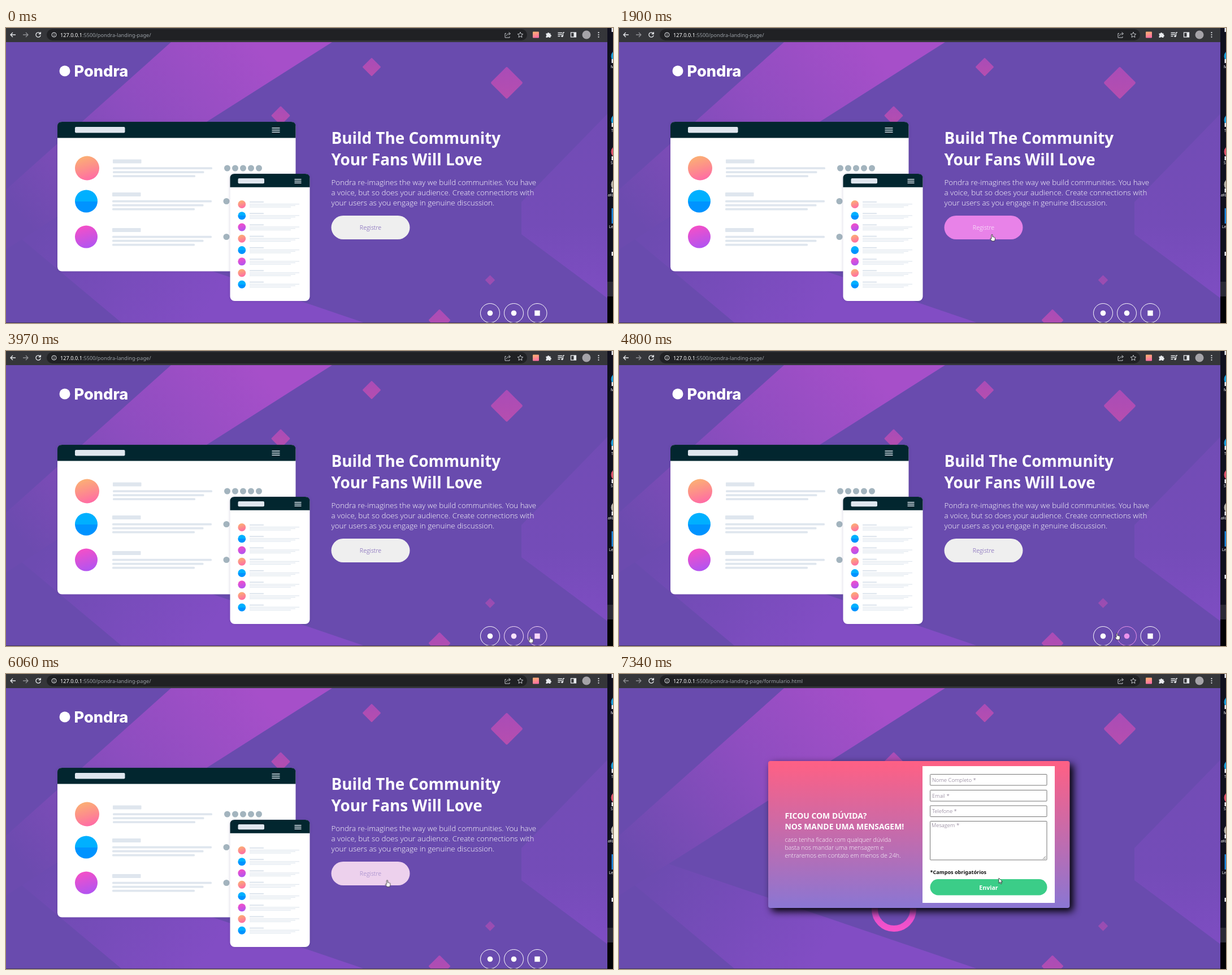
Animation of 1074x522 px, one loop 8000 ms. Source, as an HTML page:

```html
<!DOCTYPE html>
<html lang="en">
<head>
<meta charset="utf-8">
<title>Landing page demo</title>
<style>
html, body { margin: 0; width: 100%; height: 100%; overflow: hidden; background: #694bae; }
svg { display: block; width: 1074px; height: 522px; }
text { font-family: "Noto Sans", "Open Sans", sans-serif; fill: #fff; white-space: pre; }
.light, .light text { font-family: "Open Sans", "Noto Sans", sans-serif; font-weight: 300; }
.bold { font-weight: 700; }
.url { font-size: 9.2px; }
.url .dim { fill: #9aa0a6; }
.logo { font: 800 27.2px Inter, "Open Sans", sans-serif; }
.h1 { font-size: 27.85px; }
.lead { font-size: 13.4px; }
.h2 { font-size: 13.95px; }
.note { font-size: 10.65px; }
.hint { font-size: 9.5px; fill: #75657f; }
.label { font-size: 10.6px; text-anchor: middle; }
.desk { font-size: 6.5px; }
.field { fill: #fff; stroke: #767676; }
.icon { fill: none; stroke: #e8eaed; stroke-width: 1.3; }

/* one loop is 8 s, so 1% is 80 ms */
.home, .form, .back, .cursor, .hand, .arrow, .btn, .btn-text, .soc {
  animation-duration: 8s; animation-iteration-count: infinite;
}
.home { animation-name: home; animation-timing-function: step-end; }
.form { animation-name: form; animation-timing-function: step-end; }
.back { animation-name: back; animation-timing-function: step-end; }
.hand { animation-name: hand; animation-timing-function: step-end; }
.arrow { animation-name: arrow; animation-timing-function: step-end; }
.cursor { animation-name: cursor; animation-timing-function: linear; }
.btn { animation-name: btn; }
.btn-text { animation-name: btn-text; }
.soc { color: #fff; }
.soc0 { animation-name: soc0; }
.soc1 { animation-name: soc1; }
.soc2 { animation-name: soc2; }

@keyframes home { 0% { visibility: visible } 91.75%, 100% { visibility: hidden } }
@keyframes form { 0% { visibility: hidden } 91.75%, 100% { visibility: visible } }
@keyframes back { 0% { opacity: 1 } 91.75%, 100% { opacity: .5 } }
@keyframes btn {
  0%, 16%, 28.4%, 75.1% { fill: #efefef }
  19.5%, 24.6%, 78.6%, 100% { fill: #e882e8 }
}
@keyframes btn-text {
  0%, 16%, 28.4%, 75.1% { fill: #694bae }
  19.5%, 24.6%, 78.6%, 100% { fill: #fff }
}
@keyframes soc0 {
  0%, 32.3%, 40.2%, 61%, 68%, 100% { color: #fff }
  35.9%, 37.6%, 64%, 65.4% { color: #e882e8 }
}
@keyframes soc1 {
  0%, 40.3%, 51.5%, 55.2%, 63%, 100% { color: #fff }
  43.8%, 48%, 58%, 59.6% { color: #e882e8 }
}
@keyframes soc2 {
  0%, 49%, 57.3%, 100% { color: #fff }
  52%, 54.2% { color: #e882e8 }
}
@keyframes hand {
  0%, 24.5%, 37.5%, 47.4%, 54.8%, 60.1%, 65.4%, 88.5%, 100% { opacity: 0 }
  15.4%, 31.8%, 39.5%, 48.8%, 55.5%, 60.9%, 74.6% { opacity: 1 }
}
@keyframes arrow {
  0%, 24.5%, 37.5%, 47.4%, 54.8%, 60.1%, 65.4%, 88.5%, 100% { opacity: 1 }
  15.4%, 31.8%, 39.5%, 48.8%, 55.5%, 60.9%, 74.6% { opacity: 0 }
}
@keyframes cursor {
  0%, 6.49% { transform: translate(1200px, 600px) }
  6.5% { transform: translate(1006px, 514px) }
  16%, 22.8% { transform: translate(659.5px, 364.5px) }
  23.8% { transform: translate(660px, 365px) }
  32.25%, 37.5% { transform: translate(871px, 507px) }
  40.25% { transform: translate(888.5px, 505px) }
  43.75% { transform: translate(900px, 504px) }
  47.1% { transform: translate(912px, 505px) }
  51.9% { transform: translate(941px, 504px) }
  53.1% { transform: translate(938px, 504px) }
  57.4% { transform: translate(902px, 502px) }
  60%, 60.6% { transform: translate(881px, 499px) }
  63.75% { transform: translate(857px, 498px) }
  68%, 68.5% { transform: translate(830px, 483px) }
  75%, 88.49% { transform: translate(674.5px, 364.5px) }
  88.5%, 100% { transform: translate(672px, 361px) }
}
</style>
</head>
<body>
<svg viewBox="0 0 1074 522">
  <defs>
    <linearGradient id="band" gradientUnits="userSpaceOnUse" x1="440" y1="25" x2="40" y2="350">
      <stop offset="0" stop-color="#a64fc9"/><stop offset=".5" stop-color="#8c4dbf"/><stop offset="1" stop-color="#6c4baf"/>
    </linearGradient>
    <linearGradient id="fold" gradientUnits="userSpaceOnUse" x1="330" y1="540" x2="60" y2="360">
      <stop offset="0" stop-color="#824dc4"/><stop offset="1" stop-color="#6d4bb1"/>
    </linearGradient>
    <linearGradient id="side" x2="0" y2="1">
      <stop offset="0" stop-color="#724cb5"/><stop offset=".6" stop-color="#744cb8"/><stop offset="1" stop-color="#7e4dc2"/>
    </linearGradient>
    <linearGradient id="gem" x2="1" y2="1">
      <stop offset="0" stop-color="#a94cb7"/><stop offset="1" stop-color="#b64eaf"/>
    </linearGradient>
    <linearGradient id="ring" x2="0" y2="1">
      <stop offset=".5" stop-color="#b94dc0"/><stop offset=".72" stop-color="#e64fca"/><stop offset="1" stop-color="#f552cb"/>
    </linearGradient>
    <linearGradient id="orange" x1=".3" x2=".6" y2="1">
      <stop offset="0" stop-color="#fbb173"/><stop offset=".5" stop-color="#fd8f8a"/><stop offset="1" stop-color="#ff6ba6"/>
    </linearGradient>
    <linearGradient id="blue" x2="0" y2="1">
      <stop offset=".5" stop-color="#00b0ff"/><stop offset=".5" stop-color="#0093ff"/>
    </linearGradient>
    <linearGradient id="magenta" x1=".3" x2=".6" y2="1">
      <stop offset="0" stop-color="#f64fc6"/><stop offset="1" stop-color="#b054f2"/>
    </linearGradient>
    <linearGradient id="panel" x2="0" y2="1">
      <stop offset="0" stop-color="#ff6084"/><stop offset="1" stop-color="#8a76d3"/>
    </linearGradient>
  </defs>

  <rect width="1074" height="522" fill="#694bae"/>
  <path d="M292 25H577L28 374L0 392V286Z" fill="url(#band)"/>
  <path d="M28 374L88 336L635 522H205Z" fill="url(#fold)"/>
  <path d="M1064 152L912 308V365L1064 478Z" fill="url(#side)"/>
  <g id="gems" fill="url(#gem)"></g>
  <circle cx="486.5" cy="416.5" r="34" fill="none" stroke="url(#ring)" stroke-width="11"/>

  <g class="home">
    <circle cx="104" cy="76" r="9.5" fill="#fff"/>
    <text class="logo" x="120.500" y="86">Pondra</text>
    <g id="mock"></g>
    <g class="bold h1">
      <text x="575.500" y="204.500">Build The Community</text>
      <text x="575.500" y="242.500">Your Fans Will Love</text>
    </g>
    <g class="light lead">
      <text x="575.500" y="278.300">Pondra re-imagines the way we build communities. You have</text>
      <text x="575.500" y="296.300">a voice, but so does your audience. Create connections with</text>
      <text x="575.500" y="314.300">your users as you engage in genuine discussion.</text>
    </g>
    <rect class="btn" x="575.500" y="332" width="139" height="42" rx="21"/>
    <text class="btn-text label light" x="645" y="357">Registre</text>
    <g id="social"></g>
  </g>

  <g class="form">
    <rect x="264" y="154" width="533.500" height="260" rx="4" fill="url(#panel)" style="filter: drop-shadow(6px 6px 7px #000)"/>
    <g class="bold h2">
      <text x="293.500" y="255.500">FICOU COM DÚVIDA?</text>
      <text x="293.500" y="274.500">NOS MANDE UMA MENSAGEM!</text>
    </g>
    <g class="light note">
      <text x="293.500" y="297">caso tenha ficado com qualquer dúvida</text>
      <text x="293.500" y="311">basta nos mandar uma mensagem e</text>
      <text x="293.500" y="325">entraremos em contato em menos de 24h.</text>
    </g>
    <rect x="537" y="163" width="234" height="242" fill="#fff"/>
    <g id="fields"></g>
    <path d="M750 327.500L755 322.500M753 327.500L755 325.500" stroke="#444" stroke-width=".8"/>
    <text class="bold" x="550.500" y="353.500" style="font-size: 9.1px; fill: #111">*Campos obrigatórios</text>
    <rect x="550.500" y="363" width="207" height="28.500" rx="14.200" fill="#3bcd88"/>
    <text class="label bold" x="654" y="381.500">Enviar</text>
  </g>

  <!-- browser bar -->
  <rect width="1064" height="25" fill="#35363a"/>
  <rect x="72" y="2" width="850" height="20" rx="10" fill="#202124"/>
  <g class="icon">
    <path class="back" d="M17 12H8.500M12 8L8 12L12 16"/>
    <path d="M30 12H38.500M35 8L39 12L35 16" opacity=".5"/>
    <path d="M60.500 9.500A4.200 4.200 0 1 0 61.200 13M61.300 7V10.500H57.800"/>
    <g stroke-width="1"><circle cx="85" cy="12" r="4"/><path d="M85 11.500V14.300M85 9.500V10.500"/></g>
    <g stroke-width="1" stroke="#c4c7cb">
      <path d="M885 9.500H883V17H891V15M885.500 14C886 11 888 10 892 10M889.500 7.500L892.500 10L889.500 12.500"/>
      <path d="M910 7.300L911.400 10.500L914.800 10.800L912.200 13.100L913 16.500L910 14.700L907 16.500L907.800 13.100L905.200 10.800L908.600 10.500Z"/>
    </g>
    <path d="M976.500 8.500H984M976.500 11.500H984M976.500 14.500H980.500M985.500 8V14.500M985.500 8H988"/>
    <rect x="999.500" y="8" width="9" height="8"/>
  </g>
  <g fill="#e8eaed">
    <path d="M955.500 9.500H958A1.600 1.600 0 1 1 961.200 9.500H963.500V12A1.500 1.500 0 1 1 963.500 15V17H960.800A1.500 1.500 0 0 0 958 17H955.500V14.500A1.500 1.500 0 0 0 955.500 11.800Z"/>
    <circle cx="984" cy="14.500" r="1.700"/>
    <path d="M1004.500 8H1008.500V16H1004.500Z"/>
    <circle cx="1048.500" cy="8.200" r="1.100"/><circle cx="1048.500" cy="12" r="1.100"/><circle cx="1048.500" cy="15.800" r="1.100"/>
  </g>
  <rect x="932" y="6.500" width="11" height="11" rx="1" fill="url(#orange)"/>
  <circle cx="1027" cy="12" r="7.500" fill="#a5a3a8"/>
  <text class="url home" x="96" y="15.700">127.0.0.1<tspan class="dim">:5500/pondra-landing-page/</tspan></text>
  <text class="url form" x="96" y="15.700">127.0.0.1<tspan class="dim">:5500/pondra-landing-page/formulario.html</tspan></text>

  <!-- desktop edge -->
  <rect y="521" width="1064" height="1" fill="#41355f"/>
  <rect x="1064" width="10" height="522" fill="#10101e"/>
  <rect x="1064" y="449" width="10" height="26" fill="#2b2a36"/>
  <rect x="1064" y="475" width="10" height="47" fill="#030305"/>
  <g id="desk"></g>

  <g class="cursor">
    <path class="arrow" d="M0 0V9.300L2.200 7.300L3.700 10.600L5.200 9.900L3.700 6.800H6.600Z" fill="#fff" stroke="#222" stroke-width=".8"/>
    <path class="hand" d="M-1 1Q0 -.6 1 1V4.600Q2 4 2.700 5Q3.700 4.500 4.200 5.500Q5.300 5.300 5.400 6.600V9Q5.200 10.500 4.300 12H-.5Q-1.500 10 -3.300 8Q-3.300 6.300 -1 7.800Z" fill="#fff" stroke="#222" stroke-width=".8"/>
  </g>
</svg>
<script>
const NS = "http://www.w3.org/2000/svg";
const $ = id => document.getElementById(id);

function add(parent, tag, attrs, text) {
  const el = document.createElementNS(NS, tag);
  for (const k in attrs) el.setAttribute(k, attrs[k]);
  if (text) el.textContent = text;
  parent.appendChild(el);
  return el;
}
const box = (p, x, y, width, height, fill, rx = 0) => add(p, "rect", { x, y, width, height, fill, rx });
const dot = (p, cx, cy, r, fill) => add(p, "circle", { cx, cy, r, fill });

const PALE = "#dfe6ee", DARK = "#02262f", GREY = "#a3b4be";
const skins = ["url(#orange)", "url(#blue)", "url(#magenta)"];

// rounded diamonds: centre, half diagonal, opacity
for (const [x, y, r, opacity] of [[647, 69, 16, 1], [886, 97, 28, 1], [486, 155, 16.5, 1], [856.5, 446, 8.5, .7], [767, 517, 19, 1]]) {
  const s = r * 1.46;
  add($("gems"), "rect", { x: -s / 2, y: -s / 2, width: s, height: s, rx: r * .09, opacity, transform: `translate(${x} ${y}) rotate(45)` });
}

function card(x, y, w, h, head) {
  const g = add($("mock"), "g", {});
  g.style.filter = "drop-shadow(0 0 2px #3a2a7040)";
  box(g, x, y, w, h, "#fff", 8);
  add(g, "path", { d: `M${x} ${y + head}V${y + 8}q0 -8 8 -8H${x + w - 8}q8 0 8 8V${y + head}Z`, fill: DARK });
  return g;
}
function burger(g, x, y, w, gap) {
  for (let i = 0; i < 3; i++) box(g, x, y + i * gap, w, 1.5, PALE);
}

const big = card(91, 166, 421.5, 264.5, 28.5);
box(big, 122, 175, 88.5, 10.5, PALE, 2);
burger(big, 470.5, 176.3, 14, 3.6);
[248, 306.5, 369.5].forEach((y, i) => {
  const x = i ? 188 : 189;
  dot(big, i ? 142 : 143.5, y, i ? 20 : 21.5, skins[i]);
  box(big, x, y - 15.5, 50.5, 7, PALE, 1);
  [176, 161.5, 146].forEach((w, k) => box(big, x, y - 1.7 + k * 7, w, 3.6, PALE, 1.5));
  for (let k = 0; k < (i ? 1 : 5); k++) dot(big, (i ? 390 : 391.5) + k * 14, y, 5.5, GREY);
});

const small = card(396.5, 258, 141, 225, 23.8);
box(small, 410.5, 266, 46.5, 9.3, PALE, 2);
burger(small, 510.5, 267, 12, 3.2);
for (let i = 0; i < 8; i++) {
  const y = 312 + i * 20.25;
  dot(small, 417.3, y, 6.9, skins[i % 3]);
  box(small, 431, y - 5.2, 25, 2.3, PALE, .5);
  [88, 81, 73].forEach((w, k) => box(small, 431, y - 1 + k * 2.6, w, 1.2, PALE));
}

[856.5, 898.5, 940].forEach((x, i) => {
  const g = add($("social"), "g", { class: `soc soc${i}` });
  add(g, "circle", { cx: x, cy: 504.5, r: 17, fill: "none", stroke: "currentColor", "stroke-width": 1 });
  if (i < 2) dot(g, x, 504.5, 4.8, "currentColor");
  else box(g, x - 4.7, 499.8, 9.4, 9.4, "currentColor");
});

[["Nome Completo *", 177.5, 19.5], ["Email *", 205.5, 19.5], ["Telefone *", 233, 19.5], ["Mesagem *", 260.5, 68.5]].forEach(([label, y, height], i) => {
  add($("fields"), "rect", { class: "field", x: 550.5, y, width: 206.5, height, rx: 1 });
  add($("fields"), "text", { class: "hint light", x: i < 3 ? 554 : 553, y: y + (i < 3 ? 13.3 : 10.2) }, label);
});

const desk = $("desk");
[[50, "#1a9fdc"], [163, "#1a9fdc"], [219, "#e0526b"], [277, "#b9b4aa"]].forEach(([y, c]) => dot(desk, 1081, y, 10.5, c));
box(desk, 1071.5, 319, 3, 27, "#1a86e0");
[0, 55, 168, 227, 284, 396].forEach(y => box(desk, 1071.5, y, 3, 7, "#e8e8ee"));
[["M", 1070, 71], ["T", 1071, 184], ["S", 1070, 241], ["aKi", 1065, 298], ["Le", 1067, 354]].forEach(
  ([s, x, y]) => add(desk, "text", { class: "desk", x, y }, s));
</script>
</body>
</html>
```
